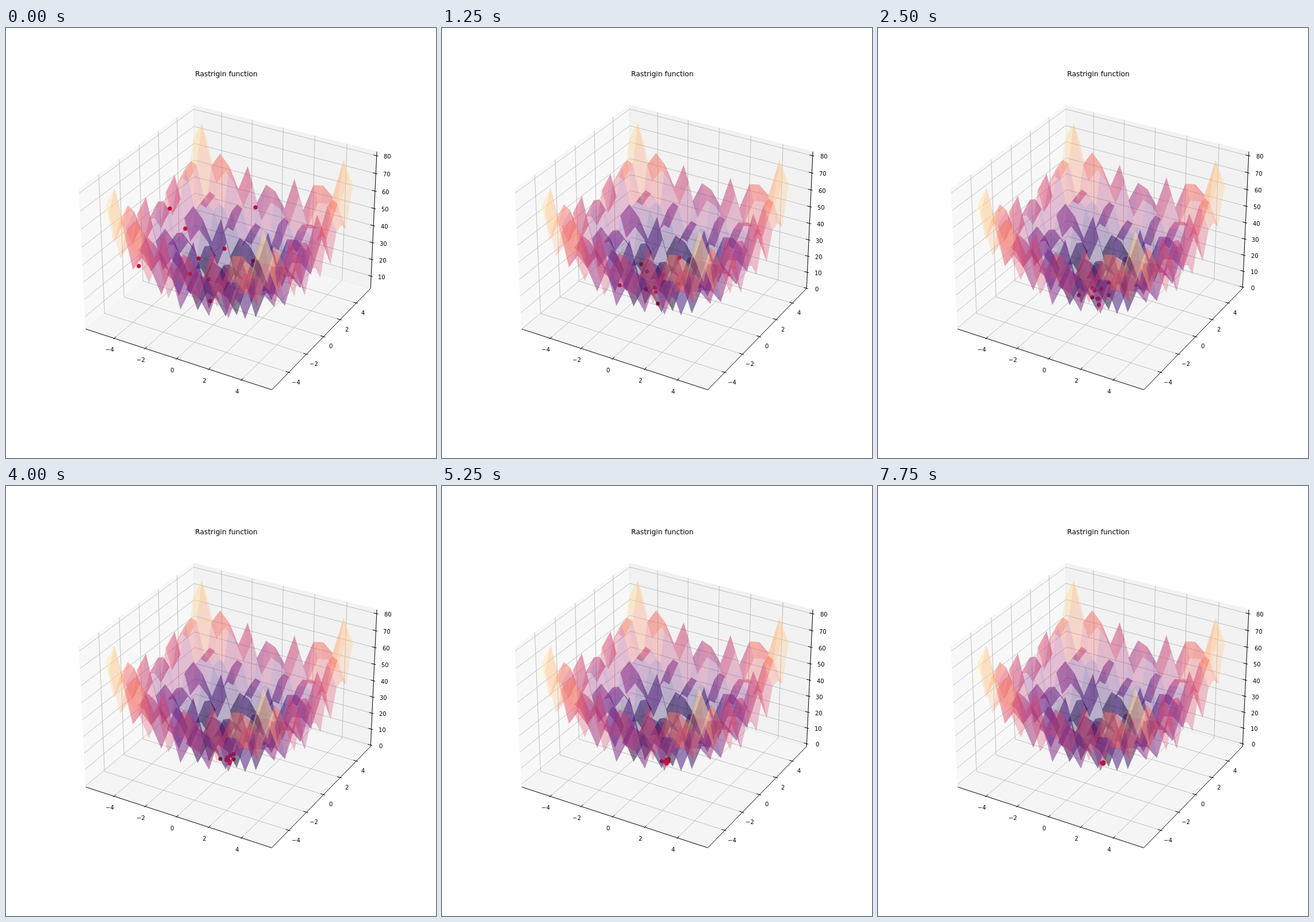
Recreate the animation shown at these times as an HTML page with a canvas. Size 748 by 748 pixels, loop 8 s.

```html
<!DOCTYPE html>
<html lang="en">
<head>
<meta charset="utf-8">
<title>Rastrigin function</title>
<style>
html, body { margin: 0; width: 100%; height: 100%; overflow: hidden; background: #fff; }
canvas { display: block; width: 748px; height: 748px; }
</style>
</head>
<body>
<canvas id="stage" width="748" height="748"></canvas>
<script>
const ctx = document.getElementById('stage').getContext('2d');
const LOOP = 8000, STEP = 250;
const EXT = 25 / 24;        // panes reach a little past the limits
const LABEL = 0.0799;       // label distance from the axis
const ALPHA = 0.3;
const LOW = -5.63, HIGH = 5.59;
const MAGMA = ['000004', '140e36', '3b0f70', '641a80', '8c2981', 'b73779',
  'de4968', 'f7705c', 'fe9f6d', 'fecf92', 'fcfdbf']
  .map(h => [0, 2, 4].map(i => parseInt(h.slice(i, i + 2), 16)));

const clamp = (v, low, high) => Math.min(Math.max(v, low), high);
const mean = list => list.reduce((s, v) => s + v, 0) / list.length;
const norm = (v, low, high) => 2 * (v - low) / (high - low) - 1;
const range = (from, count, by) => Array.from({ length: count }, (_, i) => from + i * by);

// Camera: azimuth -60, elevation 30, distance 10; inputs run from -1 to 1.
const C30 = Math.sqrt(3) / 2, VIEW = 3113.3;
function project([a, b, c]) {
  const x = a * 4 / 7, y = b * 4 / 7, z = c * 3 / 7;
  const u = C30 * x + 0.5 * y;
  const v = -0.25 * x + C30 / 2 * y + C30 * z;
  const depth = 10 - (C30 / 2 * x - 0.75 * y + 0.5 * z);
  return [391.1 + VIEW * u / depth, 369.95 - VIEW * v / depth, depth];
}

function magma(t) {
  const p = clamp(t, 0, 1) * 10, i = Math.min(Math.floor(p), 9);
  const rgb = MAGMA[i].map((c, k) => Math.round(c + (MAGMA[i + 1][k] - c) * (p - i)));
  return `rgba(${rgb},${ALPHA})`;
}

// Surface sampled every 0.6 units
const wave = x => x * x + 10 - 10 * Math.cos(2 * Math.PI * x);
const xs = range(-5.12, 18, 0.6);
const side = xs.map(x => norm(x, LOW, HIGH));
const heights = xs.map(wave);
const TOP = 2 * Math.max(...heights);
const FLOOR = 2 * Math.min(...heights);
const facets = [];
for (let i = 0; i < 17; i++) {
  for (let j = 0; j < 17; j++) {
    const corners = [[i, j], [i, j + 1], [i + 1, j + 1], [i + 1, j]];
    facets.push({ corners, level: mean(corners.map(([a, b]) => heights[a] + heights[b])) });
  }
}
const levels = facets.map(f => f.level);
const lowest = Math.min(...levels), highest = Math.max(...levels);
for (const f of facets) f.color = magma((f.level - lowest) / (highest - lowest));

// The swarm closes in on the minimum, each particle at its own seeded pace.
let seed = 7;
const random = () => (seed = seed * 16807 % 2147483647) / 2147483647;
const GOAL = [392, 483];
const swarm = [[335, 401], [380, 384], [312, 349], [285, 314], [231, 414],
  [434, 312], [355, 475], [320, 428], [353, 437], [430, 405]]
  .map(start => ({ start, pace: 1300 + 800 * random() }));

const place = ({ start, pace }, time) =>
  GOAL.map((g, i) => g + (start[i] - g) * Math.exp(-time / pace));

// The height axis starts at the lowest value found so far.
const lowLimit = time => time < 1250 ? FLOOR
  : 0.8 * Math.max(0, 2 - Math.round((time - 1250) / 1900));

function trace(points) {
  ctx.beginPath();
  points.forEach(([x, y], i) => i ? ctx.lineTo(x, y) : ctx.moveTo(x, y));
}

function line(points, color = '#000', width = 1) {
  trace(points.map(project));
  ctx.strokeStyle = color;
  ctx.lineWidth = width;
  ctx.stroke();
}

const grid = points => line(points, '#b0b0b0', 0.8);

function pane(points, grey) {
  trace(points.map(project));
  ctx.closePath();
  ctx.fillStyle = ctx.strokeStyle = `rgba(${grey},${grey},${grey},0.5)`;
  ctx.lineWidth = 1;
  ctx.fill();
  ctx.stroke();
}

// Centred text on whole pixels
function write(text, x, y, size) {
  ctx.font = `${size}px "DejaVu Sans", sans-serif`;
  ctx.fillStyle = '#000';
  ctx.fillText(text, Math.round(x - ctx.measureText(text).width / 2), Math.round(y));
}

function label(value, at) {
  const [x, y] = project(at);
  write(String(value).replace('-', '\u2212'), x, y + 7.6, 10);
}

function dot([x, y], alpha) {
  ctx.globalAlpha = alpha;
  ctx.fillStyle = '#c8102e';
  ctx.beginPath();
  ctx.arc(x, y, 3.5, 0, 2 * Math.PI);
  ctx.fill();
  ctx.globalAlpha = 1;
}

function drawAxes(zLow) {
  const e = EXT, out = e + 1 / 60, inner = e - 1 / 30, far = e + LABEL;
  pane([[-e, -e, -e], [-e, e, -e], [-e, e, e], [-e, -e, e]], 242);
  pane([[-e, e, -e], [e, e, -e], [e, e, e], [-e, e, e]], 230);
  pane([[-e, -e, -e], [e, -e, -e], [e, e, -e], [-e, e, -e]], 236);

  const flat = range(-4, 5, 2).map(t => [t, norm(t, LOW, HIGH)]);
  const tall = range(0, 9, 10).map(t => [t, norm(t, zLow, TOP)]).filter(([, p]) => p > -e);

  for (const [, p] of flat) {
    grid([[p, -e, -e], [p, e, -e], [p, e, e]]);
    grid([[e, p, -e], [-e, p, -e], [-e, p, e]]);
  }
  for (const [, p] of tall) grid([[-e, -e, p], [-e, e, p], [e, e, p]]);

  line([[-e, -e, -e], [e, -e, -e], [e, e, -e]]);
  line([[e, e, -e], [e, e, e]]);

  for (const [t, p] of flat) {
    line([[p, -out, -e], [p, -inner, -e]]);
    line([[out, p, -e], [inner, p, -e]]);
    label(t, [p, -far, -far]);
    label(t, [far, p, -far]);
  }
  for (const [t, p] of tall) {
    line([[out, e, p], [inner, e, p]]);
    label(t, [far, far, p]);
  }
  write('Rastrigin function', 383.3, 84, 12.3);
}

function drawSurface(zLow) {
  facets.map(({ corners, color }) => {
    const points = corners.map(([i, j]) =>
      project([side[i], side[j], norm(heights[i] + heights[j], zLow, TOP)]));
    return { points, color, depth: mean(points.map(p => p[2])) };
  }).sort((a, b) => b.depth - a.depth).forEach(({ points, color }) => {
    trace(points);
    ctx.fillStyle = color;
    ctx.fill();
  });
}

function draw(time) {
  const zLow = lowLimit(time);
  const spots = swarm.map(p => place(p, time));

  ctx.fillStyle = '#fff';
  ctx.fillRect(0, 0, 748, 748);
  drawAxes(zLow);
  for (const p of spots) dot(p, 1);
  drawSurface(zLow);
  // Particles fade into the surface as they near the minimum.
  for (const p of spots) {
    const distance = Math.hypot(p[0] - GOAL[0], p[1] - GOAL[1]);
    dot(p, clamp((distance / 125) ** 3, 0.1, 1));
  }
}

let shown = -1;
function tick(now) {
  const step = Math.floor(now % LOOP / STEP);
  if (step !== shown) draw((shown = step) * STEP);
  requestAnimationFrame(tick);
}
tick(0);
</script>
</body>
</html>
```
